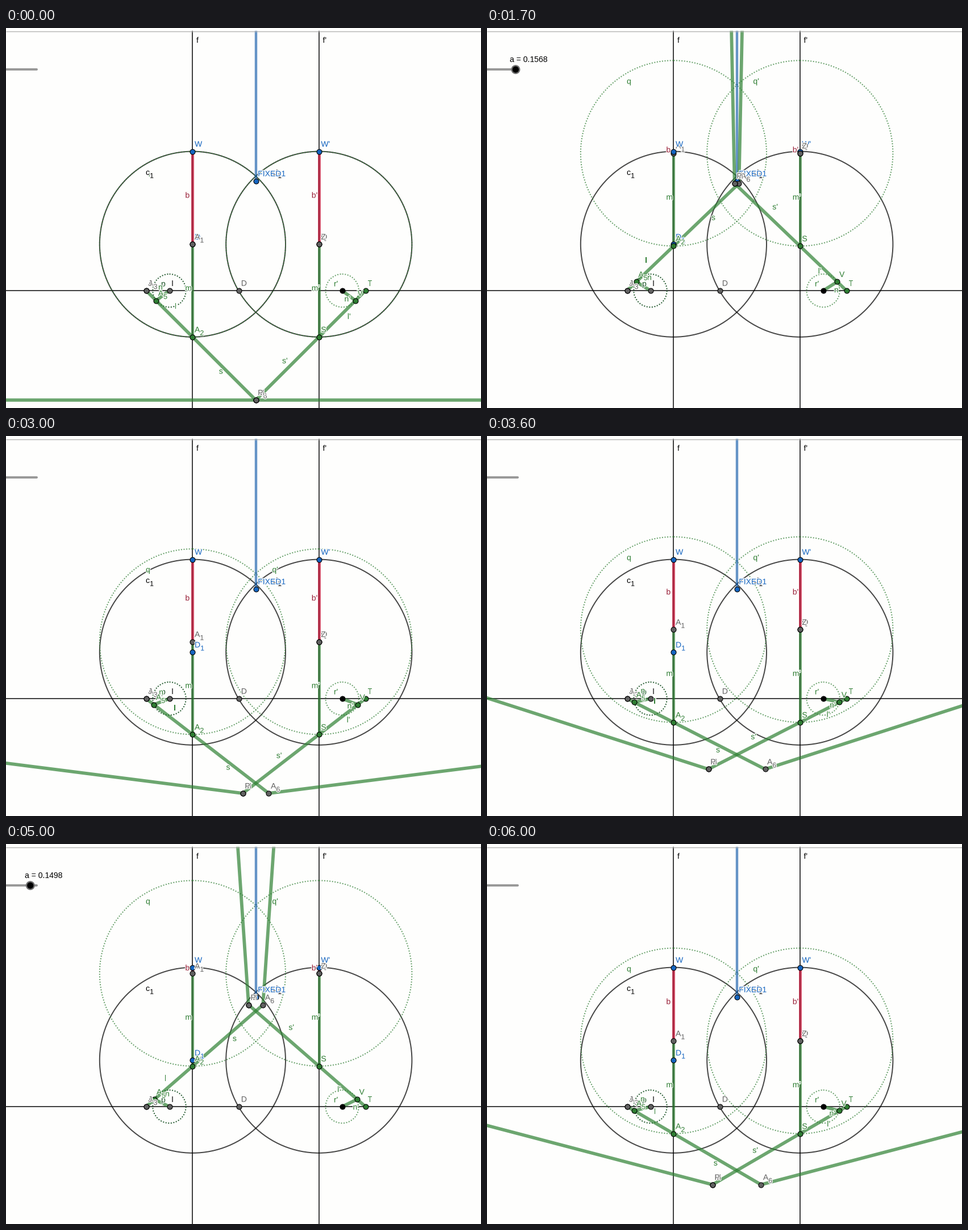
A matplotlib script for the animation above (6100 ms loop, 836 by 670 pixels).

```python
import numpy as np
import matplotlib.pyplot as plt
from matplotlib.animation import FuncAnimation
from matplotlib.patches import Circle, Rectangle
from matplotlib.patheffects import withStroke

W, H, DPI = 836, 670, 100
PX = 72 / DPI                      # points per pixel
FRAMES, STEP = 61, 100

PAPER = "#fefefd"
GREEN, BLUE, GRAY, RED = "#2e7d32", "#1565c0", "#616161", "#992038"
BLACK = "#000000"

# The linkage is laid out on fractions of the big radius
RADIUS, A_MAX = 163.6, 0.16
UNIT = RADIUS / A_MAX              # pixels per unit of a
AXIS_X, AXIS_Y = 328.4, 463.0
MIRROR = 879.2
MID_X, RIGHT_X = MIRROR / 2, MIRROR - AXIS_X
HUB = np.array([AXIS_X, AXIS_Y - RADIUS / 2])
TOP = HUB - (0, RADIUS)
J = np.array([AXIS_X - RADIUS / 2, AXIS_Y])
I = np.array([AXIS_X - RADIUS / 4, AXIS_Y])
FIXED = np.array([MID_X, 269.8])
CRANK, BAR = 29.2, 1600
ROD = (MID_X - J[0]) * np.sqrt(2)

# Unfolded slider travel: frame index -> distance run, with short stalls
TRAVEL = [(0, 0), (4, .039), (5, .039), (7, .0572), (17, .1632), (26, .2643),
          (27, .2643), (30, .3019), (34, .3365), (35, .3365), (36, .359),
          (37, .359), (38, .381), (42, .4259), (44, .448), (45, .448),
          (48, .4797), (49, .4797), (50, .4902), (56, .5523), (60, .6067)]

plt.rcParams["font.family"] = "Liberation Sans"
fig = plt.figure(figsize=(W / DPI, H / DPI), dpi=DPI, facecolor=PAPER)
ax = fig.add_axes([0, 0, 1, 1])
ax.set_xlim(0, W)
ax.set_ylim(H, 0)
ax.axis("off")
HALO = [withStroke(linewidth=2.6 * PX, foreground=PAPER)]


def flip(p):
    return np.array([MIRROR - p[0], p[1]])


def line(color, width, alpha=1.0, z=2, pts=(), cap="butt"):
    art, = ax.plot([], [], color=color, lw=width * PX, alpha=alpha, zorder=z,
                   solid_capstyle=cap, solid_joinstyle="round")
    if len(pts):
        place(art, *pts)
    return art


def place(art, *pts):
    art.set_data([p[0] for p in pts], [p[1] for p in pts])


def ring(x, y, r, color, alpha, dotted=False):
    art = Circle((x, y), r, fill=False, ec=color, alpha=alpha, lw=2 * PX,
                 ls=(0, (1, 1.3)) if dotted else "-", zorder=2)
    return ax.add_patch(art)


def dot(color, xy=(0, 0)):
    art, = ax.plot([xy[0]], [xy[1]], "o", ms=9 * PX, mfc=color, mec=BLACK,
                   mew=1.1 * PX, zorder=5, snap=False)
    return art


class Label:
    """Text with a pale rim and an optional subscript."""
    ADVANCE = {"A": 9.3, "D": 10.1, "c": 7.0, "c'": 9.7}

    def __init__(self, text, color, xy=(0, 0)):
        main, _, sub = text.partition("_")
        self.parts = [(self.draw(main, color, 14), 0, 0)]
        if sub:
            self.parts.append((self.draw(sub, color, 12.6),
                               self.ADVANCE[main], 5.5))
        self.move(xy)

    @staticmethod
    def draw(s, color, size):
        return ax.text(0, 0, s, color=color, fontsize=size * PX, zorder=6,
                       va="baseline", path_effects=HALO)

    def move(self, xy):
        for art, dx, dy in self.parts:
            art.set_position((xy[0] + dx, xy[1] + dy))


def beside(p, q):
    """Label anchor next to the middle of segment p-q."""
    d = np.subtract(q, p)
    n = np.array([-d[1], d[0]]) / max(np.hypot(*d), 1e-6)
    return (np.asarray(p) + q) / 2 + 13 * n


# Fixed lines and circles
for x in (AXIS_X, RIGHT_X):
    line(BLACK, 2, 0.75, 1, [(x, 0), (x, H)])
    ring(x, HUB[1], RADIUS, BLACK, 0.72)
line(BLACK, 2, 0.75, 1, [(0, AXIS_Y), (W, AXIS_Y)])
ring(I[0], AXIS_Y, CRANK, "#1b5427", 0.95, True)
ring(MIRROR - I[0], AXIS_Y, CRANK, GREEN, 0.7, True)
line("#1a60ac", 4.4, 0.67, 3, [(MID_X, 0), FIXED])

# Moving circles and bars
sweeps = [ring(x, 0, RADIUS, GREEN, 0.72, True) for x in (AXIS_X, RIGHT_X)]
reds = [line("#c4183a", 5, 0.75, 3) for _ in range(2)]
stems = [line(GREEN, 5, 0.7, 3) for _ in range(2)]
rods, cranks, bars = ([line("#2e8133", 5.8, 0.7, 3) for _ in range(2)]
                      for _ in range(3))

# Slider
TRACK_Y = 73.2
line("#999999", 4, 1, 3, [(-20, TRACK_Y), (54, TRACK_Y)], "round")
knob_rim = ax.add_patch(Circle((0, TRACK_Y), 8, fc="#707070", ec="none", zorder=4))
knob = ax.add_patch(Circle((0, TRACK_Y), 5.6, fc=BLACK, ec="none", zorder=4))
readout = ax.text(0, 60, "", fontsize=14 * PX, color=BLACK, zorder=6)

# Points, in drawing order
POINTS = [("D_1", BLUE), ("A_1", GRAY), ("W", BLUE), ("W'", BLUE), ("Q", GRAY),
          ("Z", GRAY), ("A_2", GREEN), ("S", GREEN), ("FIXED1", BLUE),
          ("A_6", GRAY), ("M", GRAY), ("P", GRAY), ("A_3", GRAY), ("J", GRAY),
          ("I", GRAY), ("D", GRAY), ("T", GREEN), ("A_5", GREEN), ("V", GREEN)]
dot(BLACK, flip(I))
dots = {name: dot(color) for name, color in POINTS}

# Labels, in drawing order
Label("f", BLACK, (335, 26))
Label("f'", BLACK, (557.5, 26))
sweep_tags = [Label("q", GREEN), Label("q'", GREEN)]
Label("c_1", BLACK, (246, 259))
Label("c'_1", BLACK, (468.5, 259))
Label("p", "#1b5427", (273, 455.5))
Label("r'", GREEN, (577, 455.5))
seg_tags = {s: Label(s, RED if s[0] == "b" else GREEN)
            for s in ("b", "b'", "m", "m'", "l", "l'", "n", "n'", "s", "s'")}
tags = {name: Label(name, color) for name, color in POINTS}

# Top border
ax.add_patch(Rectangle((0, 0), W, 5, fc=PAPER, ec="none", zorder=8))
line("#b4b4b4", 1.4, 1, 9, [(0, 5.5), (W, 5.5)])


def slider_value(i):
    u = np.interp(i, *zip(*TRAVEL))
    return A_MAX - abs(u % (2 * A_MAX) - A_MAX)


def pose(a):
    """Joints of the left linkage and the far end of its bar."""
    a1 = HUB - (0, UNIT * a)
    a2 = a1 + (0, RADIUS)
    phi = np.arctan2(*(a2 - J)[::-1])
    way = np.array([np.cos(phi), np.sin(phi)])
    a6 = J + ROD * way
    # nearer crossing of the rod with the crank circle
    gap = I[0] - J[0]
    reach = gap * way[0] - np.sqrt(CRANK ** 2 - (gap * way[1]) ** 2)
    a5 = J + reach * way
    tilt = np.pi / 4 - phi
    far = a6 + BAR * np.array([np.cos(tilt), -np.sin(tilt)])
    return a1, a2, a5, a6, far


def update(i):
    a = slider_value(i)
    joints = pose(a)
    a1, a2, a5, a6, far = joints
    z, s, v, p, p_far = [flip(k) for k in joints]
    top2, t, i2 = flip(TOP), flip(J), flip(I)

    at = {"D_1": HUB, "A_1": a1, "W": TOP, "W'": top2, "Q": z, "Z": z,
          "A_2": a2, "S": s, "FIXED1": FIXED, "A_6": a6, "M": p, "P": p,
          "A_3": J, "J": J, "I": I, "D": (AXIS_X + RADIUS / 2, AXIS_Y),
          "T": t, "A_5": a5, "V": v}
    for name, xy in at.items():
        place(dots[name], xy)
        tags[name].move((xy[0] + 3.6, xy[1] - 8.4))

    segs = {"b": (TOP, a1), "b'": (top2, z), "m": (a1, a2), "m'": (z, s),
            "l": (a2, J), "l'": (s, t), "n": (I, a5), "n'": (i2, v),
            "s": (a2, a6), "s'": (s, p)}
    for name, ends in segs.items():
        seg_tags[name].move(beside(*ends))

    for k, prime in enumerate(("", "'")):
        place(reds[k], *segs["b" + prime])
        place(stems[k], *segs["m" + prime])
        place(cranks[k], *segs["n" + prime])
    place(rods[0], J, a6)
    place(rods[1], t, p)
    place(bars[0], a6, far)
    place(bars[1], p, p_far)

    for art, tag, x in zip(sweeps, sweep_tags, (AXIS_X, RIGHT_X)):
        art.center = (x, a1[1])
        tag.move((x - 82.4, a1[1] - 122.5))

    x = 50.4 + (a - 0.1568) * 1085
    knob.center = knob_rim.center = (x, TRACK_Y)
    readout.set_position((x - 10, 60))
    readout.set_text(f"a = {a:.4f}")
    return []


anim = FuncAnimation(fig, update, frames=FRAMES, interval=STEP,
                     init_func=lambda: update(0), repeat=True,
                     repeat_delay=0, blit=False)
plt.show()
```
